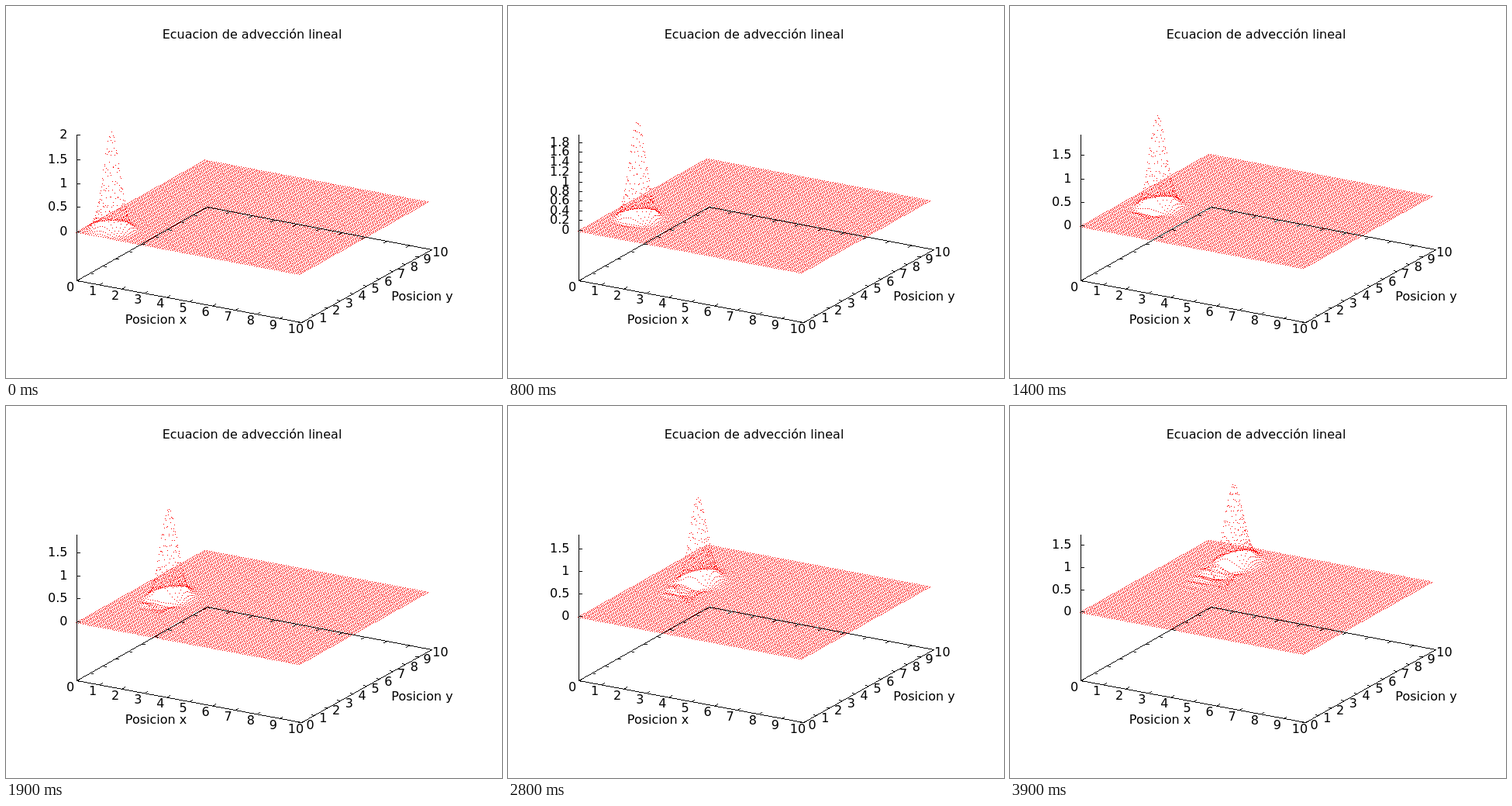
These frames come from a looping animation (640 by 480 pixels, 4000 ms). An HTML page with a canvas:

```html
<!DOCTYPE html>
<html lang="es">
<head>
<meta charset="utf-8">
<title>Ecuacion de advección lineal</title>
<style>
  html, body { margin: 0; width: 100%; height: 100%; overflow: hidden; background: #fff; }
  canvas, svg { position: absolute; left: 0; top: 0; width: 640px; height: 480px; }
  text { font: 16px "DejaVu Sans", sans-serif; fill: #000; text-anchor: middle; }
  #zlabels text { text-anchor: end; }
</style>
</head>
<body>
<canvas id="plot" width="640" height="480"></canvas>
<svg viewBox="0 0 640 480">
  <text x="317.5" y="42">Ecuacion de advección lineal</text>
  <text x="193.5" y="410">Posicion x</text>
  <text x="537" y="380">Posicion y</text>
  <g id="labels"></g>
  <g id="zlabels"></g>
</svg>
<script>
const ctx = document.getElementById('plot').getContext('2d');
const labels = document.getElementById('labels');
const zlabels = document.getElementById('zlabels');

const FRAME = 100, FRAMES = 40;
const N = 100, H = 0.1;          // grid points per side, spacing
const A = 5;                     // pulse is 2 exp(-A r²), centred on (1, 1)
const VX = 0.031, VY = 0.187;    // advance per frame
const CX = 320, CY = 240, SX = 336, SY = 218;
const S3 = Math.sqrt(3);

// View rotated by 60° and 30°; offsets from the stage centre.
// x and y run from 0 to 10, h from 0 (floor) to 1 (top of the z axis).
const dx = (x, y) => SX * (S3 * (x / 5 - 1) + (y / 5 - 1)) / 4;
const dy = (x, y, h) => SY * ((x / 5 - 1) / 8 - S3 / 8 * (y / 5 - 1) - S3 / 4 * (2 * h - 1));

function line(x0, y0, x1, y1) {
  const n = Math.max(Math.abs(x1 - x0), Math.abs(y1 - y0), 1);
  for (let i = 0; i <= n; i++) {
    ctx.fillRect(Math.round(x0 + (x1 - x0) * i / n), Math.round(y0 + (y1 - y0) * i / n), 1, 1);
  }
}

// Floor line between two domain points, with an optional pixel offset at its end
function edge(xa, ya, xb, yb, ox = 0, oy = 0) {
  line(CX + Math.trunc(dx(xa, ya)), CY + Math.trunc(dy(xa, ya, 0)),
       CX + Math.trunc(dx(xb, yb) + ox), CY + Math.trunc(dy(xb, yb, 0) + oy));
}

function addText(parent, s, x, y) {
  const t = document.createElementNS('http://www.w3.org/2000/svg', 'text');
  t.setAttribute('x', x);
  t.setAttribute('y', y);
  t.textContent = s;
  parent.appendChild(t);
}

function drawAxes() {
  ctx.fillStyle = '#000';
  edge(0, 0, 10, 0);
  edge(10, 0, 10, 10);
  edge(0, 0, 0, 10);
  edge(0, 10, 10, 10);
  line(91, 166, 91, 354);
  for (let i = 0; i <= 10; i++) {
    edge(i, 0, i, 0, 4, -2.3);
    edge(i, 10, i, 10, -4, 2.3);
    edge(10, i, 10, i, -4, -0.8);
    edge(0, i, 0, i, 4, 0.8);
  }
}

// Pulse along one axis after moving by `shift`, with the lag of centred differences
function profile(shift) {
  const dk = 0.25, u = new Float64Array(N);
  for (let k = 0; k < 18; k += dk) {
    const w = (k ? 1 : 0.5) * dk * Math.exp(-k * k / (4 * A)) / Math.sqrt(Math.PI * A);
    const phase = shift * Math.sin(k * H) / H;
    for (let i = 0; i < N; i++) u[i] += w * Math.cos(k * (i * H - 1) - phase);
  }
  return u;
}

function drawZ(lo, hi, height) {
  const step = hi - lo < 1.9999 ? 0.2 : 0.5;
  zlabels.textContent = '';
  for (let i = Math.ceil(lo / step - 1e-3); i * step <= hi + 1e-3; i++) {
    const y = CY + Math.trunc(dy(0, 0, height(i * step)));
    line(91, y, 95, y);
    addText(zlabels, String(+(i * step).toFixed(1)), 79.5, y + 5);
  }
}

function draw(frame) {
  const ux = profile(VX * frame), uy = profile(VY * frame);
  let lo = 0, hi = 0;
  for (const a of ux) for (const b of uy) {
    lo = Math.min(lo, 2 * a * b);
    hi = Math.max(hi, 2 * a * b);
  }
  if (lo > -1e-4) lo = 0;
  // The surface fills the upper two thirds of the z axis
  const height = z => (1 + 2 * (z - lo) / (hi - lo)) / 3;

  ctx.clearRect(0, 0, 640, 480);
  ctx.fillStyle = '#f00';
  for (let i = 0; i < N; i++) for (let j = 0; j < N; j++) {
    const x = i * H, y = j * H;
    ctx.fillRect(Math.floor(CX + dx(x, y)),
                 Math.ceil(CY + dy(x, y, height(2 * ux[i] * uy[j]))), 1, 1);
  }
  drawAxes();
  drawZ(lo, hi, height);
}

for (let i = 0; i <= 10; i++) {
  addText(labels, i, CX + dx(i, 0) - 7.5, CY + dy(i, 0, 0) + 13.3);
  addText(labels, i, CX + dx(10, i) + 11, CY + dy(10, i, 0) + 8.3);
}

let shown = -1;
function loop() {
  const frame = Math.floor(performance.now() / FRAME) % FRAMES;
  if (frame !== shown) draw(shown = frame);
  requestAnimationFrame(loop);
}
loop();
</script>
</body>
</html>
```
